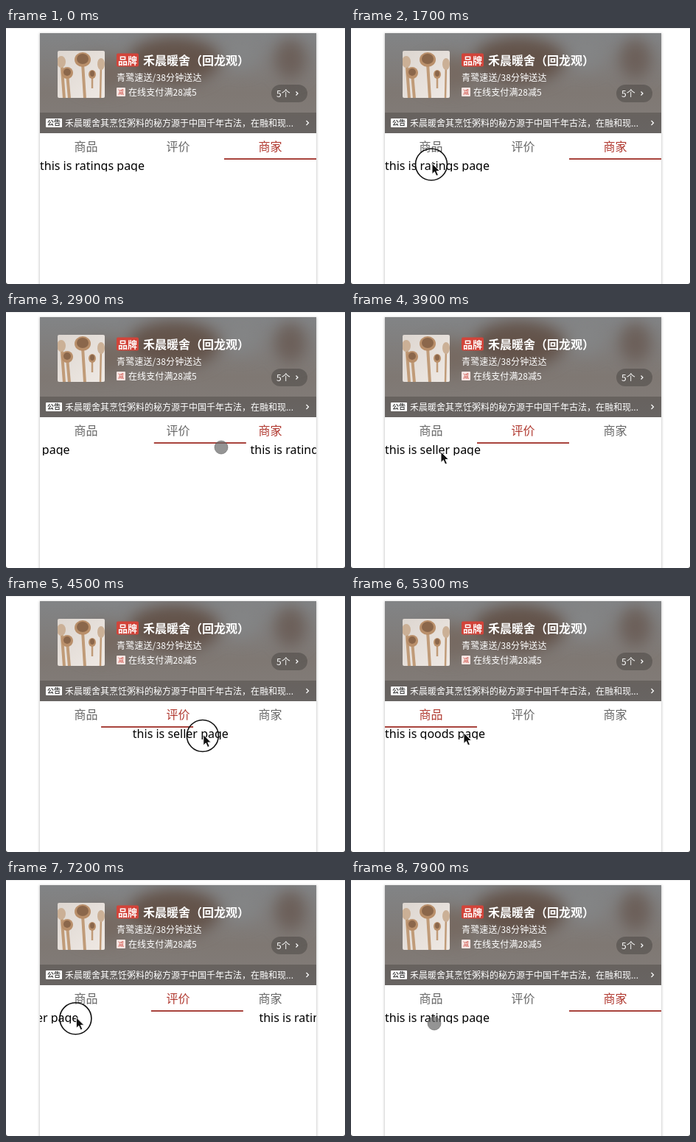
These frames come from a looping animation (460 px wide and 348 px high, 8 s). An HTML page:

```html
<!DOCTYPE html>
<html lang="zh-CN">
<head>
<meta charset="utf-8">
<style>
  html, body { margin: 0; width: 100%; height: 100%; overflow: hidden; background: #fff; }
  svg { display: block; font: 12px "Noto Sans CJK SC", "Noto Sans CJK", sans-serif; }
  .header text { fill: #fff; font-weight: 500; }
  .header text.bold { font-weight: 700; }
  .tabs text { font-size: 16px; fill: #666; text-anchor: middle; }
  .tabs text.active { fill: #b0382f; font-weight: 500; }
  .pages text { font: 500 16px "Noto Sans", sans-serif; fill: #000; }
  .chevron { fill: none; stroke: #fff; stroke-width: 1.2; }
</style>
</head>
<body>
<svg width="460" height="348" viewBox="0 0 460 348">
  <defs>
    <clipPath id="headerClip"><rect x="46" y="7" width="375" height="136"/></clipPath>
    <clipPath id="photoClip"><rect x="70" y="31" width="64" height="64" rx="2"/></clipPath>
    <clipPath id="pageClip"><rect x="46" y="179" width="375" height="16"/></clipPath>
    <filter id="blur" x="-60%" y="-60%" width="220%" height="220%" color-interpolation-filters="sRGB"><feGaussianBlur stdDeviation="10"/></filter>
    <filter id="shadow"><feGaussianBlur stdDeviation="1.5"/></filter>
    <linearGradient id="backdrop" x2="0" y2="1">
      <stop stop-color="#828486"/><stop offset=".6" stop-color="#7f7873"/><stop offset="1" stop-color="#827d7a"/>
    </linearGradient>
    <linearGradient id="photo" x2="1" y2="1">
      <stop stop-color="#ddd6d0"/><stop offset="1" stop-color="#efe9e4"/>
    </linearGradient>
  </defs>

  <path d="M0 345V348H3Q0 348 0 345M460 345V348H457Q460 348 460 345" fill="#333"/>
  <path d="M0 .5H460" stroke="#eee"/>
  <rect x="45" y="7" width="377" height="350" fill="#d0d0d0" filter="url(#shadow)"/>
  <rect x="46" y="7" width="375" height="341" fill="#fff"/>

  <g class="header" clip-path="url(#headerClip)">
    <rect x="46" y="7" width="375" height="136" fill="url(#backdrop)"/>
    <g filter="url(#blur)">
      <ellipse cx="228" cy="44" rx="62" ry="32" fill="#63534a"/>
      <ellipse cx="130" cy="62" rx="40" ry="24" fill="#766a62"/>
      <ellipse cx="386" cy="42" rx="22" ry="28" fill="#6c605a"/>
      <ellipse cx="320" cy="32" rx="24" ry="26" fill="#838485"/>
    </g>
    <g clip-path="url(#photoClip)">
      <rect x="70" y="31" width="64" height="64" fill="url(#photo)"/>
      <g fill="none" stroke="#c09b78" stroke-width="4">
        <path d="M75 42L79 96M83 62L86 96M104 48L107 96"/>
        <path d="M117 65L117 82M129 48L128 96" stroke-width="2.5"/>
      </g>
      <g fill="#b98f6a">
        <ellipse cx="75" cy="46" rx="6" ry="8" fill="#cbb096"/>
        <ellipse cx="129" cy="49" rx="5" ry="8" fill="#cbb096"/>
        <ellipse cx="83" cy="61" rx="8" ry="8"/>
        <ellipse cx="104" cy="43" rx="11" ry="10"/>
        <ellipse cx="117" cy="63" rx="5" ry="6"/>
      </g>
      <g fill="#8b674b">
        <ellipse cx="83" cy="60" rx="5" ry="5"/>
        <ellipse cx="104" cy="42" rx="8" ry="7"/>
        <ellipse cx="117" cy="62" rx="3" ry="4"/>
      </g>
    </g>
    <rect x="150" y="34.5" width="30" height="18" rx="2" fill="#d2443a"/>
    <text class="bold" x="152" y="48.5" font-size="13">品牌</text>
    <text class="bold" x="186" y="50" font-size="16">禾晨暖舍（回龙观）</text>
    <text x="150" y="71.5" letter-spacing=".15">青鹭速送/38分钟送达</text>
    <rect x="150" y="81" width="12" height="12" rx="1" fill="#f6e6e3"/>
    <text x="152" y="90" font-size="8" style="fill:#cf4a42">减</text>
    <text x="166" y="91.5" letter-spacing=".1">在线支付满28减5</text>
    <rect x="360" y="77" width="49" height="24" rx="12" fill="#000" fill-opacity=".22"/>
    <text x="367" y="93.5">5个</text>
    <path class="chevron" d="M393.5 86.5L396 89L393.5 91.5"/>
    <rect x="46" y="115" width="375" height="28" fill="#000" fill-opacity=".2"/>
    <rect x="54" y="123" width="22" height="12" rx="1" fill="#fff"/>
    <text class="bold" x="56" y="132.3" font-size="9" style="fill:#444">公告</text>
    <text x="80" y="133.5">禾晨暖舍其烹饪粥料的秘方源于中国千年古法，在融和现...</text>
    <path class="chevron" d="M407.5 126L410.5 129L407.5 132"/>
  </g>

  <g class="tabs">
    <text x="108.5" y="167">商品</text>
    <text x="233.5" y="167">评价</text>
    <text x="358.5" y="167">商家</text>
    <rect id="underline" x="46" y="177" width="125" height="2" fill="#a8433d"/>
  </g>

  <g class="pages" clip-path="url(#pageClip)">
    <g id="pages">
      <text x="46" y="193">this is goods page</text>
      <text x="421" y="193">this is seller page</text>
      <text x="796" y="193">this is ratings page</text>
    </g>
  </g>

  <g id="pointer">
    <circle id="ring" cy="1.5" r="21.5" fill="none" stroke="#111" stroke-width="1.6"/>
    <path id="arrow" d="M1 0V14.5L4.4 11.4L6.8 17L9.4 15.9L7 10.5H11.5Z" fill="#111" stroke="#fff" stroke-width=".9"/>
    <circle id="dot" r="9" fill="#666" fill-opacity=".7" stroke="#555" stroke-opacity=".5"/>
  </g>
</svg>
<script>
const LOOP = 8000, STEP = 100, WIDTH = 375, TAB = 125, THRESHOLD = 20;
const el = id => document.getElementById(id);
const labels = document.querySelectorAll('.tabs text');

// Pointer path: time, x, y
const path = [
  [0, 196, 370], [100, 194, 360], [900, 138, 194], [1400, 109, 187], [1600, 109, 184],
  [1800, 109, 184], [2300, 207, 185], [2800, 292, 184], [3100, 292, 184], [3600, 228, 187],
  [3800, 113, 194], [3900, 121, 190], [4000, 121, 191], [4600, 296, 188], [4800, 290, 188],
  [5300, 152, 186], [5500, 168, 188], [6000, 36, 189], [6300, 60, 186], [6700, 190, 190],
  [6800, 192, 190], [7300, 70, 186], [7500, 72, 190], [7900, 113, 195], [8000, 113, 195]
];
const swipes = [
  { press: 1600, release: 2800, end: 3200, from: 2, to: 1 },
  { press: 4000, release: 4600, end: 5000, from: 1, to: 0 },
  { press: 5500, release: 6000, end: 6300, from: 0, to: 1 },
  { press: 6800, release: 7300, end: 7700, from: 1, to: 2 }
];
// Spans in which the round touch pointer replaces the arrow
const touchSpans = [[2800, 3900], [4600, 5000], [6000, 6800], [7300, 8000]];

const mix = (a, b, k) => a + (b - a) * k;
const within = (t, a, b) => t >= a && t < b;
const show = (node, on) => node.style.display = on ? '' : 'none';

function pointerAt(t) {
  const i = Math.max(1, path.findIndex(p => p[0] >= t));
  const [t0, x0, y0] = path[i - 1], [t1, x1, y1] = path[i];
  const k = (t - t0) / (t1 - t0);
  return [mix(x0, x1, k), mix(y0, y1, k)];
}

function dragged(s, t) {
  const dx = pointerAt(t)[0] - pointerAt(s.press)[0];
  return s.from - Math.sign(dx) * Math.max(0, Math.abs(dx) - THRESHOLD) / WIDTH;
}

function positionAt(t) {
  const s = swipes.filter(s => t >= s.press).pop();
  if (!s) return 2;
  if (t < s.release) return dragged(s, t);
  const k = Math.min(1, (t - s.release) / (s.end - s.release));
  return mix(dragged(s, s.release), s.to, 1 - (1 - k) ** 3);
}

function draw(now) {
  const t = Math.floor(now % LOOP / STEP) * STEP;
  const position = positionAt(t);
  const finished = swipes.filter(s => t > s.end).pop();
  const active = finished ? finished.to : 2;
  const touch = touchSpans.some(([a, b]) => within(t, a, b));

  el('pages').setAttribute('transform', `translate(${-position * WIDTH} 0)`);
  el('underline').setAttribute('x', 46 + position * TAB);
  labels.forEach((label, i) => label.classList.toggle('active', i === active));
  el('pointer').setAttribute('transform', `translate(${pointerAt(t)})`);
  show(el('ring'), swipes.some(s => within(t, s.press, s.release)));
  show(el('dot'), touch);
  show(el('arrow'), !touch);
}

const start = performance.now();
(function frame() {
  draw(performance.now() - start);
  requestAnimationFrame(frame);
})();
</script>
</body>
</html>
```
